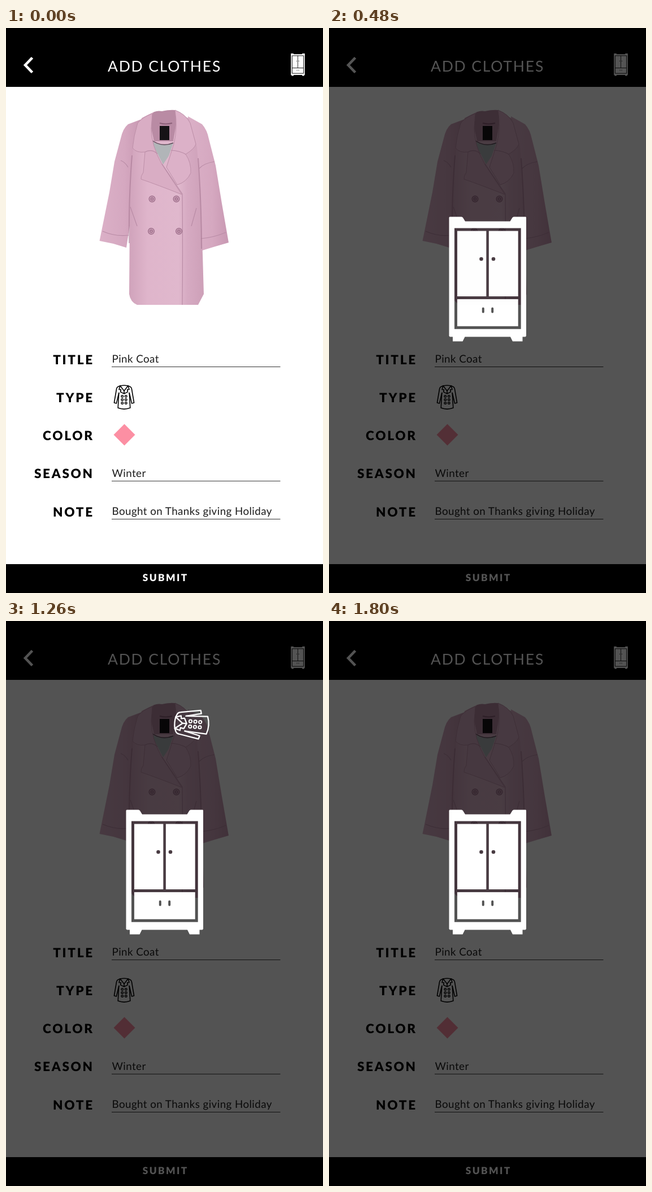
Animation, 561 px wide and 998 px high, one loop 1.92 s. Source, as an HTML page:

```html
<!DOCTYPE html>
<html lang="en">
<head>
<meta charset="utf-8">
<title>Add clothes</title>
<style>
  html, body { margin: 0; width: 100%; height: 100%; overflow: hidden; background: #fff; }
  svg { display: block; width: 561px; height: 998px; }
  text { font-family: Lato, "Open Sans", sans-serif; text-rendering: geometricPrecision; }
  .head { font-size: 26.5px; letter-spacing: 1.8px; fill: #fff; text-anchor: middle; }
  .label { font-size: 22.5px; font-weight: 900; letter-spacing: 2.7px; text-anchor: end; }
  .field { font-size: 18.8px; letter-spacing: .42px; fill: #1c1c1c; }
  .submit { font-size: 17.3px; font-weight: 900; letter-spacing: 2.4px; fill: #fff; text-anchor: middle; }
  .rule { stroke: #333; stroke-width: 1.2; }
  .seam { fill: none; stroke: #b98ca6; stroke-width: 1.2; }
</style>
</head>
<body>
<svg viewBox="0 0 561 998">
  <defs>
    <linearGradient id="body" x1="0" x2="1">
      <stop offset="0" stop-color="#d0a3bb"/>
      <stop offset=".25" stop-color="#dfb5cb"/>
      <stop offset=".66" stop-color="#e0b8cd"/>
      <stop offset=".78" stop-color="#d6aac2"/>
      <stop offset="1" stop-color="#cda0b8"/>
    </linearGradient>
    <linearGradient id="sleeve" x1="0" x2="1">
      <stop offset="0" stop-color="#dbb0c7"/>
      <stop offset=".6" stop-color="#d5a8c0"/>
      <stop offset="1" stop-color="#c898b2"/>
    </linearGradient>

    <mask id="cuts" maskUnits="userSpaceOnUse" x="200" y="320" width="162" height="245">
      <rect x="200" y="320" width="162" height="245" fill="#fff"/>
      <g fill="none" stroke="#000" stroke-width="5">
        <path d="M224.5 356H337.2V529.2H224.5ZM224.5 476.4H337.2"/>
        <path d="M280.6 356V476" stroke-width="4.5"/>
        <path d="M272.8 495.5V501.5M289.2 495.5V501.5" stroke-width="4" stroke-linecap="round"/>
      </g>
      <circle cx="269.5" cy="408" r="3.3"/>
      <circle cx="291" cy="408" r="3.3"/>
    </mask>
    <g id="wardrobe" mask="url(#cuts)">
      <path fill="#fff" d="M214 333.5H234.5Q236 333.5 237 335L241 341.5H320.5L324.5 335Q325.5 333.5 327 333.5H348Q349 333.5 349 335V544L347.5 545.5H342.5V553.5H325L321 545.5H240.5L236.5 553.5H219V545.5H214L212.5 544V335Q212.5 333.5 214 333.5Z"/>
    </g>

    <g id="coat" fill="none" stroke-width="1.6" stroke-linejoin="round" stroke-linecap="round">
      <path d="M-7 -20.5L-11 -18.8Q-13 -17.8 -13.4 -15L-17.6 9.5L-13.6 10.6L-9.2 -8"/>
      <path d="M7 -20.5L11 -18.8Q13 -17.8 13.4 -15L17.6 9.5L13.6 10.6L9.2 -8"/>
      <path d="M-9.2 -8L-10.8 18.6Q0 22.6 10.8 18.6L9.2 -8"/>
      <path d="M-7 -20.5Q0 -22 7 -20.5L0 -11.5L-7 -20.5"/>
      <path d="M-7 -20.5L-9 -14L-5.6 -13.6L-6.4 -9.6L0 -6.5L6.4 -9.6L5.6 -13.6L9 -14L7 -20.5M0 -11.5V-6.5"/>
      <g id="dots"></g>
    </g>
  </defs>

  <rect width="561" height="998" fill="#fff"/>
  <rect width="561" height="104"/>
  <rect y="947" width="561" height="51"/>
  <path d="M46.5 52.5L34 65.5L46.5 78.5" fill="none" stroke="#fff" stroke-width="4.6"/>
  <text class="head" x="280.5" y="77">ADD CLOTHES</text>
  <use href="#wardrobe" transform="translate(516.5 64.7) scale(.18) translate(-280.7 -443.5)"/>

  <!-- the garment -->
  <g stroke-linejoin="round">
    <path fill="url(#sleeve)" d="M240 161L216 170Q207 177 203 195L192 236L183 290L165.5 376L190 381L213 388L222 330L238 230Z"/>
    <path fill="url(#sleeve)" d="M322 156L347 170Q356 180 359 196L371 243L382 310L394 379L370 386L347 393L340 320L326 220Z"/>
    <path fill="url(#body)" d="M240 159L225 215Q218 290 219 340L218 470Q220 484 232 489H340L350 470L348 400L344 290L338 210L324 160L300 148H262Z"/>
    <path fill="#b98ba4" d="M258 153Q262 145 276 147Q290 144 299 145L302 165L296 200L262 200L256 172Z"/>
    <path fill="#b1b5b8" d="M257 200Q276 210 296 203L288 226L278 241Z"/>
    <path fill="none" stroke="#5d4a58" stroke-width="1.4" d="M255 196Q274 212 296 203"/>
    <path fill="none" stroke="#8c6079" stroke-width="2" d="M272 168Q282 171 294 168"/>
    <rect x="272" y="173" width="17" height="25" fill="#161316"/>
    <path fill="#d9adc4" stroke="#bd8fa8" d="M259 151Q242 157 233 168Q226 190 224 212Q231 221 246 219L243 255Q238 262 239 267Q268 277 311 294L276 241Q257 207 257 178Z"/>
    <path fill="#dcb1c8" stroke="#bd8fa8" d="M299 145Q318 152 326 168L336 205Q334 213 318 223Q328 238 327 256Q320 272 303 277L284 246L297 205Q304 176 299 145Z"/>
    <path class="seam" d="M246 219Q258 213 268 222M318 223Q308 217 292 216"/>
    <path class="seam" d="M276 240L312 293Q313 390 312 489"/>
    <path class="seam" d="M203 234Q211 237 216 246M369 236Q350 239 342 248M171 359Q194 369 217 366M389 361Q368 370 345 372M220 316L232 350M337 318L328 350"/>
    <path fill="none" stroke="#a57690" stroke-width="2" opacity=".55" d="M223 225Q217 300 218 380M340 230Q346 310 346 390"/>
    <g id="buttons" fill="#c699b2" stroke="#9b6d88" stroke-width="1.2"></g>
  </g>

  <g id="form"></g>
  <use href="#coat" x="209" y="652.5" stroke="#000"/>
  <path d="M209.5 699.5L228.5 718.5L209.5 737.5L190.5 718.5Z" fill="#fc8fa3"/>
  <text class="submit" x="282.2" y="977">SUBMIT</text>

  <g id="veil" opacity="0">
    <rect width="561" height="998" opacity=".675"/>
    <use id="flyer" href="#coat" stroke="#fff"/>
    <use id="box" href="#wardrobe"/>
  </g>
</svg>
<script>
const LOOP = 1920, STEP = 30;
const $ = id => document.getElementById(id);

function add(parent, tag, attrs, text = '') {
  const el = document.createElementNS('http://www.w3.org/2000/svg', tag);
  for (const k in attrs) el.setAttribute(k, attrs[k]);
  el.textContent = text;
  parent.append(el);
}

[['TITLE', 'Pink Coat'], ['TYPE'], ['COLOR'], ['SEASON', 'Winter'],
 ['NOTE', 'Bought on Thanks giving Holiday']].forEach(([label, value], i) => {
  const y = 593.5 + i * 67.25;
  add($('form'), 'text', { class: 'label', x: 155.8, y }, label);
  if (!value) return;
  add($('form'), 'text', { class: 'field', x: 187.5, y: y - 2.5 }, value);
  add($('form'), 'path', { class: 'rule', d: `M187 ${y + 5}H485.5` });
});

for (const y of [-2, 4, 10])
  for (const x of [-3.2, 3.2]) add($('dots'), 'circle', { cx: x, cy: y, r: 1.8, 'stroke-width': 1.4 });

for (const [cx, cy] of [[258.5, 302], [301.5, 302], [257, 359], [306, 359]]) {
  add($('buttons'), 'circle', { cx, cy, r: 5.4 });
  add($('buttons'), 'circle', { cx, cy, r: 2.2 });
}

// time, x, y
const flight = [
  [660, 592, 276], [780, 574, 261], [930, 532, 196], [1050, 478, 140],
  [1170, 388, 136], [1260, 329, 182], [1380, 291, 290], [1470, 281, 385]
];
const spin = t => 49 - .64 * (t - 1050);

// time, angle
const swing = [[1470, 0], [1560, 4.2], [1710, -4.2], [1800, 0]];

function segment(keys, t) {
  let i = 0;
  while (i < keys.length - 2 && t >= keys[i + 1][0]) i++;
  const u = (t - keys[i][0]) / (keys[i + 1][0] - keys[i][0]);
  return [i, Math.min(1, Math.max(0, u))];
}

function linear(keys, t) {
  const [i, u] = segment(keys, t);
  return keys[i][1] + (keys[i + 1][1] - keys[i][1]) * u;
}

// smooth curve through the keys
function spline(keys, t, c) {
  const [i, u] = segment(keys, t);
  const slope = k => {
    const a = keys[Math.max(0, k - 1)], b = keys[Math.min(keys.length - 1, k + 1)];
    return (b[c] - a[c]) / (b[0] - a[0]);
  };
  const p = keys[i], q = keys[i + 1], dt = q[0] - p[0], v = 1 - u;
  return p[c] * v * v * (1 + 2 * u) + q[c] * u * u * (3 - 2 * u)
    + dt * u * v * (slope(i) * v - slope(i + 1) * u);
}

function draw(time) {
  const t = Math.floor((time % LOOP) / STEP) * STEP;
  const p = Math.min(1, Math.max(0, (t - 30) / 480));
  $('veil').setAttribute('opacity', (1 - Math.cos(Math.PI * p)) / 2);

  const x = spline(flight, t, 1), y = spline(flight, t, 2);
  $('flyer').setAttribute('transform', `translate(${x} ${y}) rotate(${spin(t)}) scale(1.44)`);
  $('flyer').setAttribute('visibility', t >= 660 && t < 1470 ? 'visible' : 'hidden');
  $('box').setAttribute('transform', `rotate(${linear(swing, t)} 281 553)`);
}

const start = performance.now();
function tick() {
  draw(performance.now() - start);
  requestAnimationFrame(tick);
}
tick();
</script>
</body>
</html>
```
